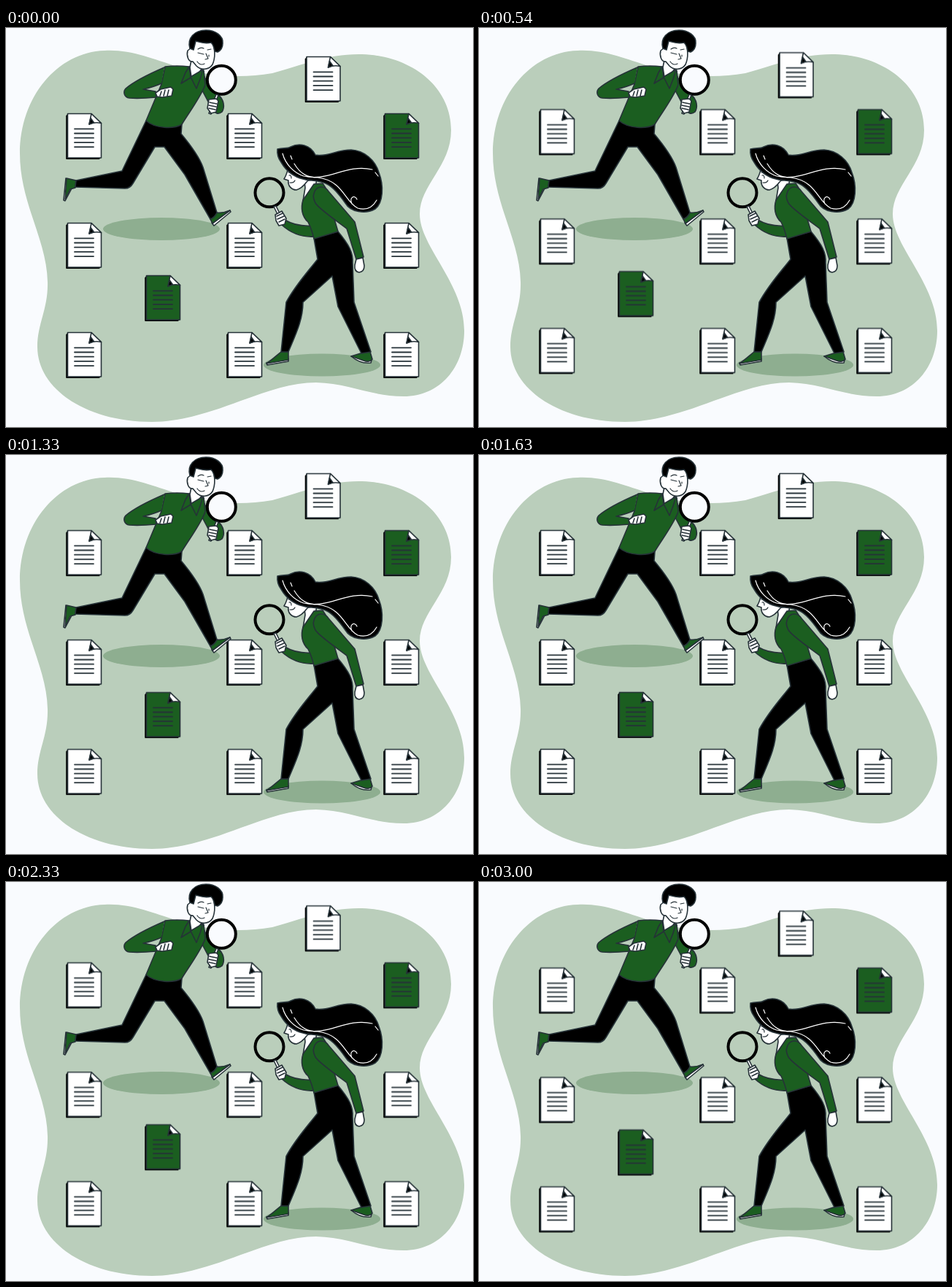
Write an HTML page that moves like this. It is 640 by 547 pixels and loops after 3.04 s.

```html
<!DOCTYPE html>
<html lang="en">
<head>
<meta charset="utf-8">
<title>Document search</title>
<style>
  html, body { margin: 0; width: 100%; height: 100%; overflow: hidden; background: #f9fbfe; }
  svg { display: block; width: 640px; height: 547px; }
  .art { stroke: #263238; stroke-width: 1.6; stroke-linejoin: round; stroke-linecap: round; }
  .green { fill: #1b5e20; }
  .white { fill: #fff; }
  .black { fill: #000; }
  .line { fill: none; }
  .strand { fill: none; stroke: #fff; stroke-width: 1.2; }
  .lens { fill: none; stroke: #000; stroke-width: 4; }
  .shade { fill: #8eae90; }
</style>
</head>
<body>
<svg viewBox="0 0 640 547">
  <defs>
    <g id="doc" class="art">
      <path d="M0 1.5L-1.5 3V61.7H43L45 60Z" fill="#000" stroke="#000"/>
      <path d="M0 0H32.5L46 13V60.5H0Z"/>
      <path class="white" d="M32.5 0L29.5 14.5Q37 11 46 13Z"/>
      <path class="black" d="M31.5 6L29.5 14.5L36 12.2Z"/>
      <path class="line" stroke-width="1.8" d="M9.5 20.8H35.5M9.5 27H35.5M9.5 33.2H35.5M9.5 39.4H35.5M9.5 45.6H35.5"/>
    </g>
  </defs>

  <path fill="#bacebb" d="M135 31C170 29 200 42 235 53C275 66 320 70 365 62C410 50 440 35 488 36C555 38 610 80 610 140C610 190 567 215 567 255C567 300 628 350 628 415C628 465 595 505 545 505C500 505 470 487 425 486C354 486 285 539 200 540C110 540 43 495 43 437C43 405 58 385 57 348C56 290 19 240 19 172C19 95 70 33 135 31Z"/>
  <ellipse class="shade" cx="213" cy="275.5" rx="80" ry="15.5"/>
  <ellipse class="shade" cx="433" cy="462" rx="80" ry="15.5"/>

  <g id="docs"></g>

  <!-- running man -->
  <g class="art">
    <path class="white" d="M82 206L79 236L81 237L90 220Z"/>
    <path class="green" d="M83 206L96 209L95 219L88 221L81 235Z"/>
    <path class="white" d="M282 267L285 271L308 252L307 250Z"/>
    <path class="green" d="M280 262C284 261 287 257 289 253Q298 254 307 250L283 268Z"/>
    <path class="black" d="M192 127L241 132L240 145C255 163 265 177 270 191L289 253C287 258 284 260 280 262L245 201L217 163H204L174 213Q170 220 163 220L95 218L96 209L159 196Z"/>
    <path class="green" d="M268 58C274 74 282 83 291 92C299 98 300 109 296 115C291 119 286 117 284 112L276 99L267 82Z"/>
    <path class="green" d="M218 53Q234 51 251 53L271 58L273 78C266 96 252 114 241 132C230 139 204 138 192 127L213 77Z"/>
    <path class="green" d="M217 54C196 63 176 73 164 83C160 88 162 95 169 96C182 97 195 96 206 95L205 87L188 84Q202 81 213 76"/>
    <path class="white" d="M205 89L212 84L226 81L229 84L227 93L214 95L207 94Z"/>
    <path class="line" d="M213 87L211 93M218 85L216 93M223 85L221 93"/>
    <path class="white" d="M254 44L252 54L254 67L258 72L268 56Z"/>
    <path class="green" d="M251 53L246 61L240 76L253 68Z"/>
    <path class="green" d="M253 67L261 83L266 70L270 57Z"/>
    <path class="white" d="M259 17L282 18C287 28 287 41 283 50C278 58 267 58 261 52L256 46C250 47 247 38 249 31L254 27Z"/>
    <path class="black" d="M252 28C248 14 258 3 274 3C287 3 298 11 297 21C297 27 294 31 290 33L286 32Q285 24 281 20C271 22 264 19 260 18L257 30Z"/>
    <path class="line" d="M263 29Q267 26 271 28M263 34L271 36M276 30L281 29M278 37V39M274 35L277 42L273 43M262 46Q266 52 272 49" stroke-width="1.2"/>
    <circle class="lens" cx="295.3" cy="71.3" r="19.5" style="fill:#f9fbfe"/>
    <path class="white" d="M288 91L278 117L281 118L291 92Z"/>
    <path class="white" d="M278 98L288 97L291 100L288 115L281 117L276 110Z"/>
    <path class="line" d="M279 102L289 104M278 106L288 108M278 110L287 112"/>
  </g>

  <!-- searching woman -->
  <g class="art">
    <path class="white" d="M357 459L358 462L387 457V453Z"/>
    <path class="green" d="M377 444H387V455L357 460C367 453 372 448 377 444Z"/>
    <path class="white" d="M473 450Q486 461 500 459L501 455Z"/>
    <path class="green" d="M486 446L499 444L502 454Q498 459 490 456L473 450Z"/>
    <path class="black" d="M422 288L455 279C470 297 476 308 475 322L477 376L500 444L487 446L455 382L447 340L407 376C407 400 397 420 387 444H377L384 376C397 352 413 335 427 317Z"/>
    <path class="green" d="M382 263C394 270 407 272 420 271L422 286C404 287 389 280 378 270Z"/>
    <path class="white" d="M409 210L426 207L424 217L407 237L410 219Z"/>
    <path class="green" d="M422 214L407 236C404 246 405 258 414 266Q419 276 422 289L455 279Q447 253 441 224L434 213Z"/>
    <path class="green" d="M422 227C425 215 437 216 442 224L478 266L490 314L480 317L467 275C451 263 429 248 424 240Q420 232 422 227"/>
    <path class="white" d="M480 317L489 315L491 326Q491 334 484 335Q477 334 478 325Z"/>
    <path class="white" d="M387 188Q386 199 381 207L387 209C386 216 391 222 398 222C405 220 409 215 412 211L419 204Z"/>
    <path class="line" d="M388 202Q391 201 391 206M387 198L392 198M389 212Q394 213 396 209" stroke-width="1.2"/>
    <path class="black" d="M372 166C380 164 385 166 390 163C402 157 417 160 424 174C440 177 453 167 473 167C491 168 506 181 511 198C518 216 517 240 506 248C492 256 472 252 465 240C458 230 450 219 440 214C430 208 415 210 407 207C395 204 384 196 377 184Q371 176 372 166Z"/>
    <path class="strand" d="M379 172C383 187 395 199 408 203C443 211 465 186 502 194M506 198L510 203M390 175L392 180M395 186C404 201 414 205 427 205C462 209 464 238 482 247Q499 252 508 236M474 241C470 232 478 228 481 235"/>
    <circle class="lens" cx="361" cy="225.8" r="19.5"/>
    <path class="white" d="M367 245L379 269L382 268L370 244Z"/>
    <path class="white" d="M369 256L378 251L384 261L382 269L374 271L370 264Z"/>
    <path class="line" d="M371 258L379 254M372 262L381 258M374 266L382 262"/>
  </g>
</svg>
<script>
  const LOOP = 3040;
  const docs = document.getElementById('docs');
  const places = [
    [412, 39.5], [84.5, 117.5], [304.5, 117.5], [519.5, 117.5, true],
    [84.5, 267.5], [304.5, 267.5], [519.5, 267.5], [192.5, 339.5, true],
    [84.5, 417.5], [304.5, 417.5], [519.5, 417.5]
  ];

  for (const [x, y, isGreen] of places) {
    const use = document.createElementNS('http://www.w3.org/2000/svg', 'use');
    use.setAttribute('href', '#doc');
    use.setAttribute('x', x);
    use.setAttribute('y', y);
    use.setAttribute('fill', isGreen ? '#1b5e20' : '#fff');
    docs.append(use);
  }

  // [time in ms, vertical shift in px]
  const drift = [[0, 0], [1490, -15.6], [3000, 0.4], [LOOP, 0]];
  docs.animate(
    drift.map(([t, y]) => ({ offset: t / LOOP, transform: `translateY(${y}px)` })),
    { duration: LOOP, iterations: Infinity }
  );
</script>
</body>
</html>
```
